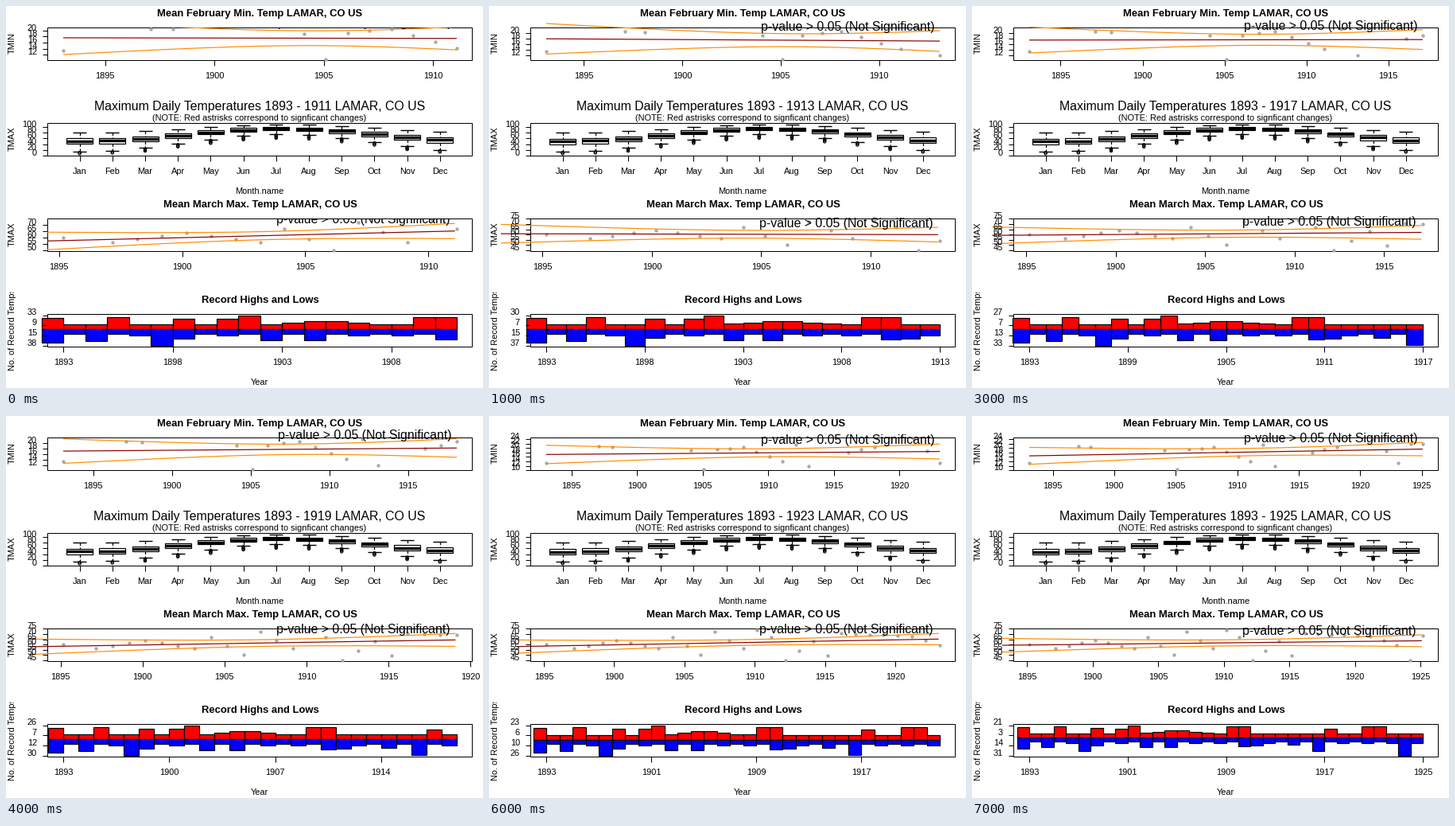
A matplotlib script for the animation above (8000 ms loop, 600x480 px).

```python
import numpy as np
import matplotlib.pyplot as plt
from matplotlib.animation import FuncAnimation
from matplotlib.patches import Circle, Rectangle

W, H, DPI = 600, 480, 72
LEFT, RIGHT, TOP, BOTTOM = 52, 586, 27, 68   # box of the first panel
X0, X1 = 72, 567                             # first and last data point
FIRST = 1893
PLACE = "LAMAR, CO US"
MONTHS = "Jan Feb Mar Apr May Jun Jul Aug Sep Oct Nov Dec".split()
YEARS = np.arange(FIRST, 1926)

# Turning points of the mean temperatures; years between are interpolated
FEB_TURNS = {1893: 13.4, 1897: 20.6, 1904: 19, 1905: 10.5, 1906: 19.2, 1908: 20.5,
             1911: 14.2, 1912: 21.5, 1913: 12, 1916: 18, 1921: 24.1, 1923: 13.2,
             1924: 21.7}
MAR_TURNS = {1895: 60, 1897: 56.5, 1900: 64, 1903: 56.2, 1904: 67, 1906: 50, 1907: 72,
             1909: 56.5, 1910: 74, 1911: 66.6, 1912: 45.1, 1914: 63, 1915: 49.6,
             1916: 70.5, 1921: 68, 1923: 59.4, 1924: 45.3, 1925: 68.4}
FEB_GAPS = [(1894, 1896), (1899, 1903), (1914, 1915), (1919, 1920)]
MAR_GAPS = [(1893, 1894), (1896, 1896)]

# Years with many records stand out from a low base
HIGH_PEAKS = {1893: 27, 1896: 29, 1899: 25, 1901: 24, 1902: 33, 1910: 29, 1911: 29,
              1918: 23, 1921: 29, 1922: 29}
LOW_PEAKS = {1893: 31, 1895: 27, 1898: 38, 1899: 21, 1903: 25, 1905: 25, 1911: 23,
             1912: 22, 1915: 20, 1917: 37, 1924: 50}

plt.rcParams["font.family"] = "Liberation Sans"
fig = plt.figure(figsize=(W / DPI, H / DPI), dpi=DPI, facecolor="white")
ax = fig.add_axes([0, 0, 1, 1])


def series(turns, gaps):
    vals = np.interp(YEARS, list(turns), list(turns.values()))
    for a, b in gaps:
        vals[(YEARS >= a) & (YEARS <= b)] = np.nan
    return vals


def with_peaks(base, peaks):
    return np.array([peaks.get(y, b) for y, b in zip(YEARS, base)])


FEB_MIN = series(FEB_TURNS, FEB_GAPS)
MAR_MAX = series(MAR_TURNS, MAR_GAPS)
HIGHS = with_peaks(11 + 8 * np.exp(-((YEARS - 1905.5) / 2) ** 2), HIGH_PEAKS)
LOWS = with_peaks(11 + 3.5 * (YEARS % 2), LOW_PEAKS)


def text(x, y, s, size=11, **kw):
    kw = {"ha": "center", "va": "baseline", **kw}
    return ax.text(x, y, s, fontsize=size, color="black", **kw)


def line(xs, ys, color="black", lw=1.0, **kw):
    return ax.plot(xs, ys, color=color, lw=lw, solid_capstyle="butt", **kw)[0]


def clip(artist, x, y, w, h):
    artist.set_clip_on(True)
    artist.set_clip_path(Rectangle((x, y), w, h, transform=ax.transData))


def frame(dy, ylab, yc=47):
    ax.add_patch(Rectangle((LEFT, TOP + dy), RIGHT - LEFT, BOTTOM - TOP,
                           fill=False, ec="black", lw=1))
    label = text(11, yc + dy, ylab, rotation=90, rotation_mode="anchor")
    clip(label, 0, dy, W, 120)


def x_tick(x, dy, label):
    line([x, x], [BOTTOM + dy, BOTTOM + dy + 7])
    text(x, dy + 91, label)


def y_tick(y, label):
    line([LEFT - 6, LEFT], [y, y])
    text(39, y, label, ha="right")


def fit_band(x, y, grid):
    """Linear fit with its 95 % confidence band."""
    slope, icept = np.polyfit(x - FIRST, y, 1)
    df = len(x) - 2
    t = 1.96 + 2.37 / df + 2.8 / df ** 2
    sd = np.sqrt(np.sum((y - icept - slope * (x - FIRST)) ** 2) / df)
    dx2 = (x - x.mean()) ** 2
    half = t * sd * np.sqrt(1 / len(x) + (grid - x.mean()) ** 2 / dx2.sum())
    mid = icept + slope * (grid - FIRST)
    return mid, mid - half, mid + half


def trend(i, dy, data, offset, step, title, ylab, note_x, whole_span):
    n = 19 + 2 * i
    ok = ~np.isnan(data[:n])
    x, y = YEARS[:n][ok] + offset, data[:n][ok]
    low, span = y.min(), np.ptp(y)

    def px(v):
        return X0 + (v - x[0]) * (X1 - X0) / (x[-1] - x[0])

    def py(v):
        return dy + 67 - (v - low) * 38.4 / span

    text(319.5, dy + 13, title, 13, weight="bold")
    frame(dy, ylab)
    for year in range(1895, 1930, 5):
        if LEFT <= px(year) <= RIGHT:
            x_tick(px(year), dy, str(year))
    for v in range(0, 100, step):
        if -0.04 * span <= v - low <= 1.04 * span:
            y_tick(py(v), str(v))

    ax.plot(px(x), py(y), "o", ms=4.4, mfc="#a9a9a9", mec="none")
    ends = (FIRST + 0.09, YEARS[n - 1] + 0.09) if whole_span else (x[0], x[-1])
    grid = np.linspace(*ends, 60)
    band = fit_band(x, y, grid)
    parts = [line(px(grid), py(c), color, 1.2)
             for c, color in zip(band, ("#8b0000", "#ff8c00", "#ff8c00"))]
    # The note rests on the right end of the upper curve
    parts.append(text(note_x, py(band[2][-1]), "p-value > 0.05 (Not Significant)", 15.87))
    if i == 0:
        for p in parts:
            clip(p, LEFT, TOP + dy, RIGHT - LEFT, BOTTOM - TOP)


def month_boxes(i):
    text(319, 131, f"Maximum Daily Temperatures 1893 - {1911 + 2 * i} {PLACE}", 15.87)
    text(319, 144, "(NOTE: Red astrisks correspond to signficant changes)")
    frame(120, "TMAX")
    text(319, 236, "Month.name")
    for v in range(0, 101, 20):
        y_tick(188 - 0.36 * v, str(v))
    for k, name in enumerate(MONTHS):
        x = 92.6 + 41.2 * k
        x_tick(x, 120, name)
        warm = np.cos(2 * np.pi * (k - 6.2) / 12)
        med = 162 - 8 * warm + 0.05 * i * (1 - warm)
        half = 2.75 - 0.75 * warm
        top, low, out = 154 - 5 * warm, 172 - 11 * warm, 176.5 - 9.5 * warm
        for a, b in ((top, med - half), (med + half, low)):
            line([x, x], [a, b], lw=1.2, ls=(0, (3, 2)))
        for y in (top, low):
            line([x - 8.5, x + 8.5], [y, y], lw=1.4)
        ax.add_patch(Rectangle((x - 16.5, med - half), 33, 2 * half,
                               fc="white", ec="black", lw=1.2))
        line([x - 16.5, x + 16.5], [med, med], lw=3.4)
        for y in np.arange(low + 1.3, out + 0.1, 1.2):
            ax.add_patch(Circle((x, y), 1.7, fill=False, ec="black", lw=1))


def records(i):
    n = 19 + 2 * i
    last = YEARS[n - 1]
    # Older records get broken, so the extremes shrink
    hi = int(np.interp(i, [0, 1, 3, 5, 7], [33, 30, 27, 26, 21]))
    lo = int(np.interp(i, [0, 1, 3, 5, 6, 7], [38, 37, 33, 27, 26, 31]))
    scale = 38.5 / (hi + lo)
    zero = 388.5 + hi * scale
    step = (X1 - X0) / (last - FIRST)

    text(319.5, 373, "Record Highs and Lows", 13, weight="bold")
    frame(360, "No. of Record Temps", 46.5)
    text(319, 476, "Year")
    for k, v in enumerate(np.linspace(hi, -lo, 4)):
        y_tick(388.5 + k * 38.5 / 3, str(abs(int(np.floor(v + 1e-6)))))
    for year in range(FIRST, last + 1, -(-(last - FIRST) // 4)):
        x_tick(X0 + (year - FIRST) * step, 360, str(year))

    ups = HIGHS[:n] * hi / HIGHS[:n].max()
    downs = LOWS[:n] * lo / LOWS[:n].max()
    for k, (up, down) in enumerate(zip(ups, downs)):
        x = X0 + (k - 1) * step
        for h, color in ((-up, "#ff0000"), (down, "#0000ff")):
            ax.add_patch(Rectangle((x, zero), step, h * scale, fc=color, ec="black", lw=1.2))


def draw(i):
    ax.clear()
    ax.set_xlim(0, W)
    ax.set_ylim(H, 0)
    ax.axis("off")
    trend(i, 0, FEB_MIN, 0.09, 2, f"Mean February Min. Temp {PLACE}", "TMIN", 451, False)
    month_boxes(i)
    trend(i, 240, MAR_MAX, 0.165, 5, f"Mean March Max. Temp {PLACE}", "TMAX", 449.5, True)
    records(i)
    return []


anim = FuncAnimation(fig, draw, frames=8, interval=1000, repeat=True,
                     repeat_delay=0, init_func=lambda: [])
plt.show()
```
